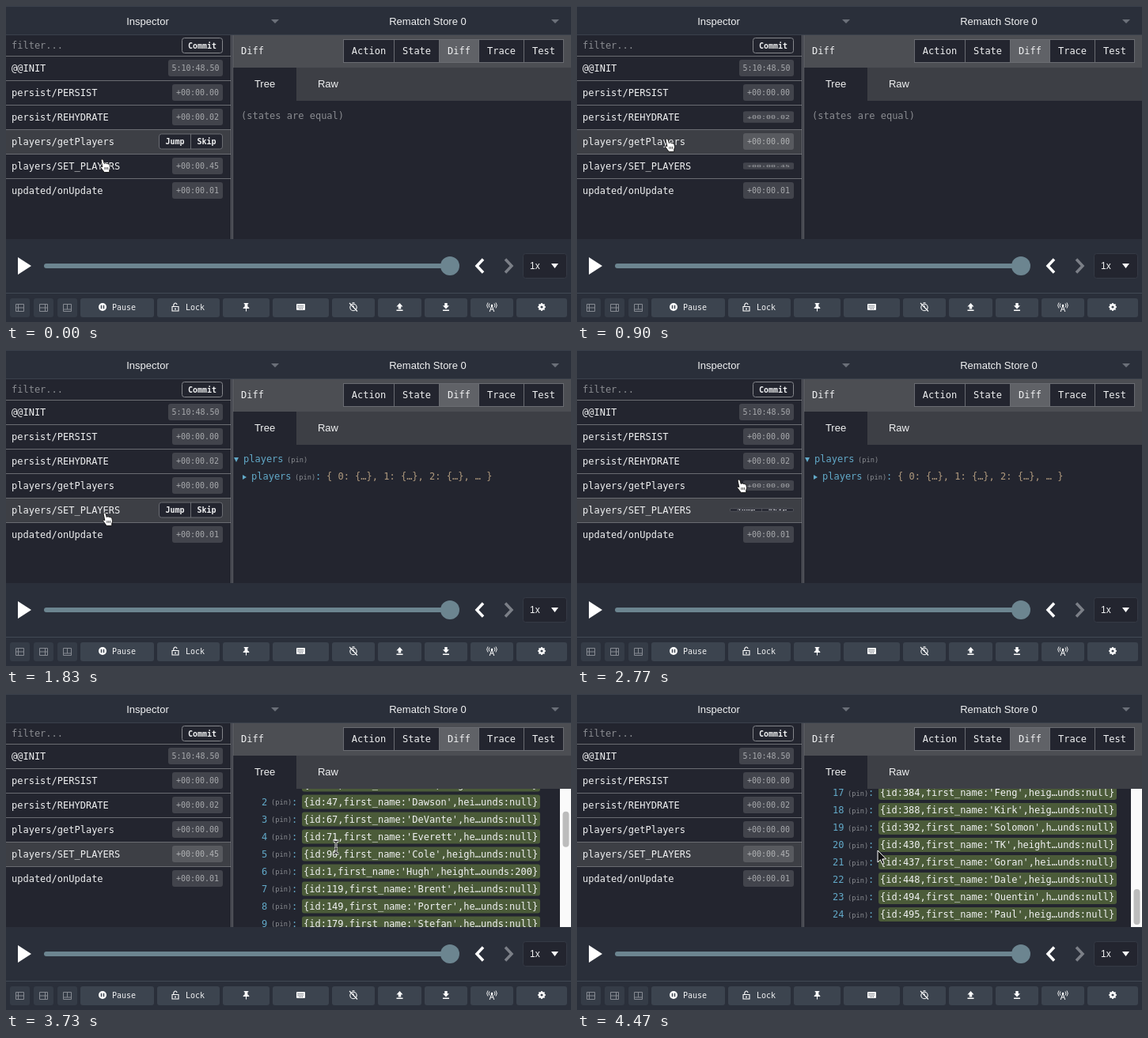
Animation of 714 by 400 pixels, one loop 4510 ms. Source, as an HTML page:

```html
<!DOCTYPE html>
<html>
<head>
<meta charset="utf-8">
<style>
html, body { margin: 0; width: 100%; height: 100%; overflow: hidden; background: #2a2f3a }
svg { display: block }
text { font: 12px "DejaVu Sans Mono", "Noto Sans Mono", monospace; fill: #f0f1f2 }
.sans { font: 13px "Liberation Sans", Arial, sans-serif }
.small { font-size: 10px }
.bold { font-size: 10px; font-weight: bold }
.pin { font-size: 8.7px; fill: #8b8d92 }
.mid { text-anchor: middle }
.key { fill: #62a9c8 }
.tan { fill: #b09a7e }
.dim { fill: #8a8c91 }
</style>
</head>
<body>
<svg id="stage" width="714" height="400" viewBox="0 0 714 400"></svg>
<script>
const LOOP = 4510, PICK = 1830, OPEN = 3230;
const DARK = '#23252f', LINE = '#6a6c72', BAR = '#2a2f3a', BUTTON = '#3c444f';

const rect = (x, y, w, h, fill, more = '') =>
  `<rect x="${x}" y="${y}" width="${w}" height="${h}" fill="${fill}" ${more}/>`;
const text = (x, y, s, cls = '') => `<text x="${x}" y="${y}" class="${cls}">${s}</text>`;
const path = (d, fill = '#fff', more = '') => `<path d="${d}" fill="${fill}" ${more}/>`;
const line = (d, color = '#fff', w = 1) => path(d, 'none', `stroke="${color}" stroke-width="${w}"`);
const at = (x, y, body) => `<g transform="translate(${x} ${y})">${body}</g>`;
const group = (id, body, more = '') => `<g id="${id}" ${more}>${body}</g>`;

// Left list
const actions = [
  ['@@INIT', '5:10:48.50'], ['persist/PERSIST', '+00:00.00'], ['persist/REHYDRATE', '+00:00.02'],
  ['players/getPlayers', '+00:00.00'], ['players/SET_PLAYERS', '+00:00.45'], ['updated/onUpdate', '+00:00.01']
];
const rowMid = i => 78.5 + 31 * i;

function actionRow([name, time], i) {
  const left = i ? 210 : 205;
  const stamp = rect(left, -10.5, 274 - left, 21, 'rgba(255,255,255,.14)', 'rx="3"') +
    text((left + 274) / 2, 3.5, time, 'small mid" fill-opacity=".58');
  const tools = rect(193.5, -9.5, 80, 19, DARK, `rx="3" stroke="${LINE}"`) +
    line('M233.5-9.5v19', LINE) + text(213.5, 3.5, 'Jump', 'bold mid') + text(253.5, 3.5, 'Skip', 'bold mid');
  return text(7, rowMid(i) + 4, name) + group('time' + i, stamp) + group('tools' + i, tools) +
    (i < 5 ? rect(0, 94 + 31 * i, 285, 1, LINE) : '');
}

const list = rect(0, 37, 287, 258, DARK) +
  text(7, 54, 'filter...', 'dim') +
  rect(222.5, 40.5, 51, 19, DARK, 'rx="3" stroke="#85878c"') + text(248, 54, 'Commit', 'bold mid') +
  rect(0, 63, 285, 1, LINE) +
  group('pick', rect(0, 157, 285, 30, '#3d3f45')) +
  actions.map(actionRow).join('') +
  rect(284, 37, 1, 258, LINE) + rect(286, 37, 1, 258, LINE);

// Right panel
const tabs = [['Action', 426, 490], ['State', 490, 547], ['Diff', 547, 597], ['Trace', 597, 654], ['Test', 654, 704]];
const panel = rect(287, 37, 427, 258, DARK) +
  rect(287, 37, 427, 41, '#4c4e53') + text(297, 61, 'Diff') +
  tabs.map(([s, a, b]) => rect(a + .5, 42.5, b - a, 29, s == 'Diff' ? '#606267' : DARK, `stroke="${LINE}"`) +
    text((a + b + 1) / 2, 61, s, 'mid')).join('') +
  rect(367, 78, 347, 42, '#3d3f45') +
  text(327, 103, 'Tree', 'sans mid') + text(407, 103, 'Raw', 'sans mid');

const players = [
  [14, 'Gus'], [25, 'Lee'], [47, 'Dawson'], [67, 'DeVante'], [71, 'Everett'], [90, 'Cole'], [1, 'Hugh', 200],
  [119, 'Brent'], [149, 'Porter'], [179, 'Stefan'], [1593, 'Calvin'], [241, 'Rafi', 240], [255, 'Ross'],
  [290, 'Neil'], [301, 'Vince'], [330, 'Felix'], [361, 'Otis'], [384, 'Feng'], [388, 'Kirk'], [392, 'Solomon'],
  [430, 'TK'], [437, 'Goran'], [448, 'Dale'], [494, 'Quentin'], [495, 'Paul']
];

function playerRow([id, name, weight = null], i) {
  const y = 182 + 22 * i, dx = i > 9 ? 7 : 0;
  const value = `{id:${id},first_name:'${name}',height`.slice(0, 30) + '…' + `pounds:${weight}}`.slice(-10);
  return text(323, y + 4, i, 'key') + text(335 + dx, y + 3.5, '(pin)', 'pin') + text(361 + dx, y + 4, ':', 'key') +
    rect(374 + dx, y - 9, 301, 18, '#4b5b39', 'rx="3"') + text(376 + dx, y + 4, value);
}

const tree = group('tree',
  path('M288 136h6l-3 6z', '#62a9c8') + text(300, 142, 'players', 'key') + text(355, 142, '(pin)', 'pin') +
  group('arrow', path('M-2.5-3v6l5-3z', '#62a9c8')) +
  text(310, 164, 'players', 'key') + text(365, 164, '(pin)', 'pin') +
  group('closed', text(391, 164, ':', 'key') + text(405, 164, '{ 0: {…}, 1: {…}, 2: {…}, … }', 'tan')) +
  group('rows', players.map(playerRow).join('')));

const view = '<clipPath id="view"><rect x="287" y="120" width="427" height="175"/></clipPath>' +
  group('equal', text(297, 143, '(states are equal)', 'dim')) +
  group('diff', tree, 'clip-path="url(#view)"') +
  group('bar', rect(700, 120, 14, 175, '#fafafa') +
    group('thumb', rect(703.5, 123, 8, 45, '#bcbcbc', 'rx="4"')));

// Header, slider and toolbar
const header = rect(0, 0, 714, 37, BAR) + rect(0, 0, 714, 1, '#3a404b') + rect(0, 36, 714, 1, '#3a404b') +
  text(179, 24, 'Inspector', 'sans mid') + text(533, 24, 'Rematch Store 0', 'sans mid') +
  path('M335 17h10l-5 5zM689 17h10l-5 5z', '#6b7079');

const slider = rect(0, 295, 714, 105, BAR) + path('M15 318v22l17-11z') +
  rect(48, 326, 513, 6, '#6c8590', 'rx="3"') + '<circle cx="561" cy="329" r="12" fill="#6c8590"/>' +
  line('M603 320.5l-8 8.5 8 8.5', '#fff', 3.5) + line('M631 320.5l8 8.5-8 8.5', '#7b7f87', 3.5) +
  rect(653.5, 313.5, 55, 31, DARK, 'rx="3" stroke="#353a45"') +
  `<text x="662" y="333" class="sans" style="font-size:12px">1x</text>` + path('M689 326h9l-4.5 6z');

const frame = line('M-5-4.5H5V4.5H-5z', '#868a92');
const gear = '<circle r="2.8" fill="none" stroke="#fff" stroke-width="2.2"/>' +
  line('M0-5v10M-5 0h10M-3.5-3.5l7 7M-3.5 3.5l7-7', '#fff', 1.7) + `<circle r="1.6" fill="${BUTTON}"/>`;
const waves = line('M-3-4.5q-2 2.5 0 5M3-4.5q2 2.5 0 5M-5-5.5q-2.6 3.5 0 7M5-5.5q2.6 3.5 0 7', '#fff', .9);
const icons = [
  [5, 30, frame + line('M-2-4v8M-5 0h10', '#868a92')],
  [35, 60, frame + line('M2-4v8M-5 0h10', '#868a92')],
  [65, 90, frame + line('M0-4v6M-5 2h10', '#868a92')],
  [94, 187, at(-18.5, 0, '<circle r="5" fill="#fff"/>' + line('M-1.5-2.3v4.6M1.5-2.3v4.6', BUTTON, 1.5)) + text(-6.5, 3.5, 'Pause', 'small')],
  [191, 270, at(-16.5, 0, line('M-4-.5h8v5.5h-8zM-2.2-.5v-2.5q2.2-4 4.4 0', '#fff', 1.1) + rect(-.8, 1.5, 1.6, 2, '#fff')) + text(-3.5, 3.5, 'Lock', 'small')],
  [274, 333, path('M-2.8-5h5.6v1.2h-1v3l2 1.7v1h-3.3v3.6h-1v-3.6h-3.3v-1l2-1.7v-3h-1z')],
  [337, 408, rect(-5.5, -4, 11, 8, '#fff', 'rx="1"') + line('M-4-1.8h8M-4 .2h8M-2.5 2.3h5', BUTTON, 1).replace('/>', ' stroke-dasharray="1.2 .8"/>')],
  [412, 466, '<circle cy=".5" r="4.2" fill="none" stroke="#fff" stroke-width="1.1"/>' + line('M-5-5L5 5.5M-1.5-5.3h3M0-2v3', '#fff', 1.1)],
  [470, 525, path('M0-5l4 4.5h-2.3v3h-3.4v-3h-2.3zM-4 3.5h8v1.4h-8z')],
  [529, 583, path('M0 2.5l4-4.2h-2.3v-3.3h-3.4v3.3h-2.3zM-4 3.5h8v1.4h-8z')],
  [587, 641, waves + line('M-2.8 6L0-2l2.8 8M-1.7 3h3.4', '#fff', 1) + '<circle cy="-2" r="1.3" fill="#fff"/>'],
  [645, 709, gear]
];
const toolbar = rect(0, 363, 714, 1, '#424954') +
  icons.map(([a, b, icon], i) => rect(a, 370, b - a, 24, i < 3 ? '#353c47' : BUTTON, 'rx="3"') +
    at((a + b) / 2, i < 3 ? 382 : 381, icon)).join('');

const outline = 'stroke="#111" stroke-width=".9"';
const cursor = group('cursor',
  group('hand', path('M-4-7q1.5-1.8 3 0l1.2 4.5 1-.6q1.2-.4 1.8.6 1.2-.7 1.9.4 1.5-.4 2 1l.6 3.6-.8 3.5v2.5h-6.5l-4.5-6q-.6-2 1.6-1.2l.6.6z', '#fff', outline) +
    line('M.8 2v3M2.7 2v3M4.6 2v3', '#111', .7)) +
  group('beam', line('M-3.5-8q3.5 0 3.5 2v12q0 2-3.5 2M3.5-8q-3.5 0-3.5 2v12q0 2 3.5 2M-2 2h4', '#fff', 2.8) +
    line('M-3.5-8q3.5 0 3.5 2v12q0 2-3.5 2M3.5-8q-3.5 0-3.5 2v12q0 2 3.5 2M-2 2h4', '#111', 1.1)) +
  group('pointer', path('M0 0v15l3.4-3.2 2.4 5.6 2.4-1-2.4-5.5h4.8z', '#111', 'stroke="#fff" stroke-width="1"')));

document.getElementById('stage').innerHTML = header + list + panel + view + slider + toolbar + cursor;

// Motion
const el = id => document.getElementById(id);
const move = (id, x, y, more = '') => el(id).setAttribute('transform', `translate(${x} ${y}) ${more}`);
const show = (id, on) => el(id).style.display = on ? '' : 'none';
const clamp = v => Math.min(1, Math.max(0, v));
const ease = v => (v = clamp(v)) < .5 ? 2 * v * v : 1 - 2 * (1 - v) ** 2;

// Keys are [time, ...values]
function along(keys, t, curve) {
  const i = keys.findIndex(k => k[0] > t);
  if (i < 0) return keys[keys.length - 1].slice(1);
  const a = keys[i - 1], b = keys[i], p = curve((t - a[0]) / (b[0] - a[0]));
  return a.slice(1).map((v, j) => v + (b[j + 1] - v) * p);
}

const mouse = [
  [0, 124, 202], [100, 124, 202], [350, 108, 202], [600, 107, 196], [700, 107, 196], [800, 112, 152],
  [900, 116, 176], [1200, 119, 180], [1230, 119, 180], [1400, 127, 209], [1500, 127, 209], [1800, 127, 209],
  [1830, 127, 214], [2330, 130, 216], [2370, 130, 214], [2600, 178, 198], [2770, 207, 172], [2870, 232, 167],
  [2900, 238, 167], [3180, 346, 163], [3400, 346, 163], [3620, 417, 194], [3970, 417, 194], [4440, 380, 198]
];
const scrolls = [[0, 0], [3430, 0], [3600, 40], [3870, 142], [3970, 180], [4300, 390], [4440, 431]];

// Times at which a row swaps its time stamp and its tools
const swaps = [[], [], [815, 1080], [-999, 100, 1000, 1260, 2680, 2920], [100, 690, 1270, 2642], []];

function flip(i, t) {
  const past = swaps[i].filter(s => s <= t), age = t - (past.length ? past[past.length - 1] : -999);
  const turn = d => ease((age - d) / 170) * Math.PI / 2;
  const scale = [Math.cos(turn(0)), Math.sin(turn(150))];
  const tools = past.length % 2;
  [['time', 1 - tools], ['tools', tools]].forEach(([name, shown]) => {
    show(name + i, scale[shown] > .01);
    move(name + i, 0, rowMid(i), `scale(1 ${scale[shown]})`);
  });
}

function draw(now) {
  const t = now % LOOP, picked = t >= PICK, open = t >= OPEN;
  actions.forEach((_, i) => flip(i, t));
  move('pick', 0, picked ? 31 : 0);
  show('equal', !picked);
  show('diff', picked);
  show('closed', !open);
  show('rows', open);
  show('bar', open);
  move('arrow', 301.5, 161, `rotate(${90 * ease((t - OPEN - 40) / 150)})`);
  const [scroll] = along(scrolls, t, v => v);
  move('tree', 0, -scroll);
  move('thumb', 0, scroll * 124 / 431);
  move('cursor', ...along(mouse, t, ease));
  show('hand', t < 3470);
  show('beam', t >= 3470 && t < 4380);
  show('pointer', t >= 4380);
}

const start = performance.now();
(function tick() {
  draw(performance.now() - start);
  requestAnimationFrame(tick);
})();
</script>
</body>
</html>
```
